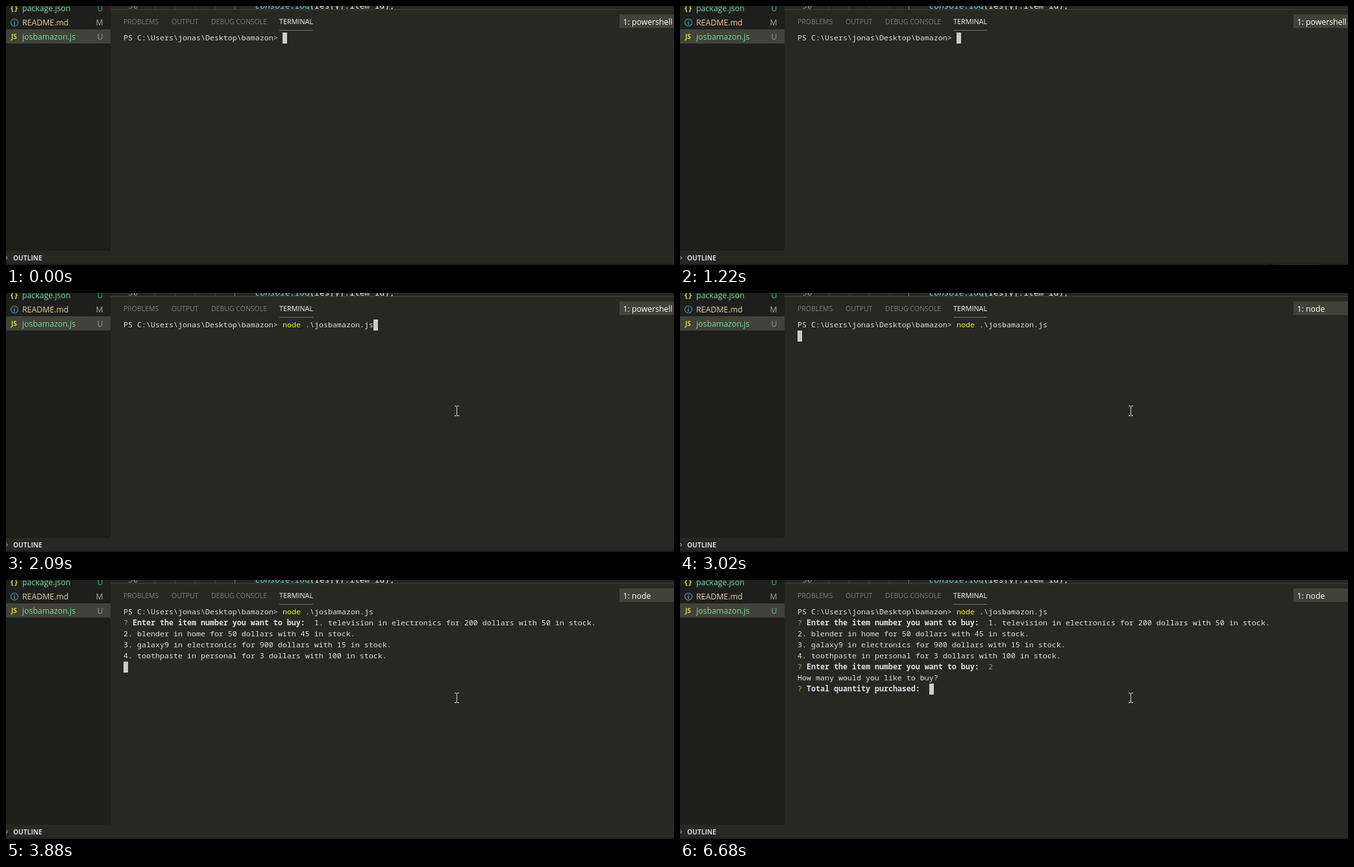
An HTML page that plays this animation: 1029x400 px, repeating every 8 s.

```html
<!DOCTYPE html>
<html lang="en">
<head>
<meta charset="utf-8">
<title>Terminal session</title>
<style>
  html, body { margin: 0; width: 100%; height: 100%; overflow: hidden; background: #272822; }
  svg { display: block; width: 1029px; height: 400px; }
  text { white-space: pre; }
  .ui { font: 12.3px "Open Sans", "Noto Sans", sans-serif; }
  .tab { font: 10.5px "Open Sans", "Noto Sans", sans-serif; fill: #7c7c73; }
  .term { font: 500 11.667px "Noto Sans Mono", "DejaVu Sans Mono", monospace; fill: #dedede; }
  .code { font: 500 12.83px "Noto Sans Mono", "DejaVu Sans Mono", monospace; fill: #f8f8f2; }
  .added { fill: #78d6a2; }
  .changed { fill: #f0cf98; }
  .badge { opacity: .75; }
  .icon { font: bold 10px "Open Sans", sans-serif; fill: #d6cc45; }
  .bold { font-weight: bold; fill: #dcdcdc; }
  .yellow { fill: #f0f02e; }
  .green { fill: #8fc02d; }
  .cyan { fill: #5cb0cc; }
</style>
</head>
<body>
<svg viewBox="0 0 1029 400">
  <defs><clipPath id="editor"><rect x="161" width="868" height="5"/></clipPath></defs>
  <rect width="1029" height="400" fill="#272822"/>

  <!-- sidebar -->
  <rect width="161" height="378" fill="#1e1f1c"/>
  <rect y="36" width="161" height="22" fill="#414339"/>
  <g class="ui">
    <text class="added" x="25" y="8">package.json</text>
    <text class="added badge" x="140.5" y="8">U</text>
    <text class="changed" x="25" y="30">README.md</text>
    <text class="changed badge" x="138.5" y="30">M</text>
    <text class="added" x="25" y="52">josbamazon.js</text>
    <text class="added badge" x="140.5" y="52">U</text>
  </g>
  <text class="icon" x="7" y="7" style="font-size:12px;letter-spacing:1.5px">{}</text>
  <circle cx="13" cy="25.5" r="5.5" fill="none" stroke="#519aba" stroke-width="1.1"/>
  <path d="M13 22.2v1.5M13 24.8v4.2" stroke="#519aba" stroke-width="1.5"/>
  <text class="icon" x="8" y="51">JS</text>
  <path d="M-.5 386l3 3l-3 3" fill="none" stroke="#c5c5c5"/>
  <text class="tab" x="11" y="393" style="font-weight:bold;fill:#d4d4d4;font-size:10.2px">OUTLINE</text>

  <!-- editor edge -->
  <g clip-path="url(#editor)">
    <path d="M229.5 0v5M260.5 0v5M291.5 0v5M322.5 0v5" stroke="#41423b"/>
    <path d="M352.5 0v5" stroke="#767771"/>
    <text class="code" x="188" y="4" style="fill:#90908a">50</text>
    <text class="code" x="383" y="4"><tspan fill="#66d9ef" font-style="italic">console</tspan>.<tspan fill="#66d9ef">log</tspan>(res[y].item_id);</text>
  </g>
  <rect x="161" y="5" width="868" height="1" fill="#414339"/>

  <!-- panel header -->
  <text class="tab" x="181" y="28">PROBLEMS</text>
  <text class="tab" x="255" y="28">OUTPUT</text>
  <text class="tab" x="316" y="28">DEBUG CONSOLE</text>
  <text class="tab" x="421" y="28" style="fill:#f8f8f2;font-size:10.8px">TERMINAL</text>
  <rect x="421" y="37" width="52" height="1" fill="#75715e"/>
  <rect x="945" y="13" width="84" height="21" fill="#414339"/>
  <text class="ui" id="shell" x="950.5" y="28.5" fill="#ffffff"></text>

  <!-- status bar -->
  <rect y="398" width="1029" height="2" fill="#1e1f1c"/>
  <rect id="hover" x="922" y="399" width="61" height="1" fill="#30312c"/>

  <g id="lines"></g>
  <rect id="caret" width="7" height="17" fill="#cccccc"/>
  <path id="arrow" d="M909 398h1l2 2h-3z" fill="#050505"/>
  <path id="beam" d="M-3.5 -7.5h3M.5 -7.5h3M0 -7v14M-3.5 7.5h3M.5 7.5h3" fill="none" stroke="#d8d8d8"/>
</svg>
<script>
const LOOP = 8000, LEFT = 181, TOP = 41, COL = 7, ROW = 17;
const $ = id => document.getElementById(id);
const NS = "http://www.w3.org/2000/svg";

// [start, end, row, column, style, text]
const ask = "Enter the item number you want to buy:";
const runs = [
  [0, LOOP, 0, 0, "", "PS C:\\Users\\jonas\\Desktop\\bamazon>"],
  [2090, LOOP, 0, 35, "yellow", "node"],
  [2090, LOOP, 0, 40, "", ".\\josbamazon.js"],
  [3800, LOOP, 1, 0, "green", "?"],
  [3800, LOOP, 1, 2, "bold", ask],
  [3880, LOOP, 1, 42, "", "1. television in electronics for 200 dollars with 50 in stock."],
  [3880, LOOP, 2, 0, "", "2. blender in home for 50 dollars with 45 in stock."],
  [3880, LOOP, 3, 0, "", "3. galaxy9 in electronics for 900 dollars with 15 in stock."],
  [3880, LOOP, 4, 0, "", "4. toothpaste in personal for 3 dollars with 100 in stock."],
  [5970, LOOP, 5, 0, "green", "?"],
  [5970, LOOP, 5, 2, "bold", ask],
  [5970, 6680, 5, 42, "", "2"],
  [6680, LOOP, 5, 42, "cyan", "2"],
  [6680, LOOP, 6, 0, "", "How many would you like to buy?"],
  [6680, LOOP, 7, 0, "green", "?"],
  [6680, LOOP, 7, 2, "bold", "Total quantity purchased:"]
].map(([start, end, row, col, style, text]) => {
  const el = document.createElementNS(NS, "text");
  el.setAttribute("class", "term " + style);
  el.setAttribute("x", LEFT + col * COL);
  el.setAttribute("y", TOP + row * ROW + 12);
  el.textContent = text;
  $("lines").append(el);
  return { el, start, end };
});

// [start, column, row]
const carets = [
  [0, 35, 0], [2090, 55, 0], [2940, 0, 1], [3800, 42, 1],
  [3880, 0, 5], [5970, 43, 5], [6680, 29, 7]
];
// [start, x, y]
const beams = [[1300, 840, 322], [1380, 728, 218], [1460, 694, 182]];
const shells = [[0, "1: powershell"], [3020, "1: node"]];

const latest = (steps, t) => steps.filter(s => s[0] <= t).pop();
const show = (el, on) => el.setAttribute("visibility", on ? "visible" : "hidden");

function draw(t) {
  for (const { el, start, end } of runs) show(el, t >= start && t < end);

  const [, col, row] = latest(carets, t);
  $("caret").setAttribute("x", LEFT + col * COL);
  $("caret").setAttribute("y", TOP + row * ROW);

  const beam = latest(beams, t);
  show($("beam"), beam);
  if (beam) $("beam").setAttribute("transform", `translate(${beam[1] + .5} ${beam[2]})`);

  show($("arrow"), t >= 1220 && t < 1300);
  show($("hover"), t >= 610 && t < 1700);
  $("shell").textContent = latest(shells, t)[1];
}

const begin = performance.now();
function tick() {
  draw((performance.now() - begin) % LOOP);
  requestAnimationFrame(tick);
}
tick();
</script>
</body>
</html>
```
